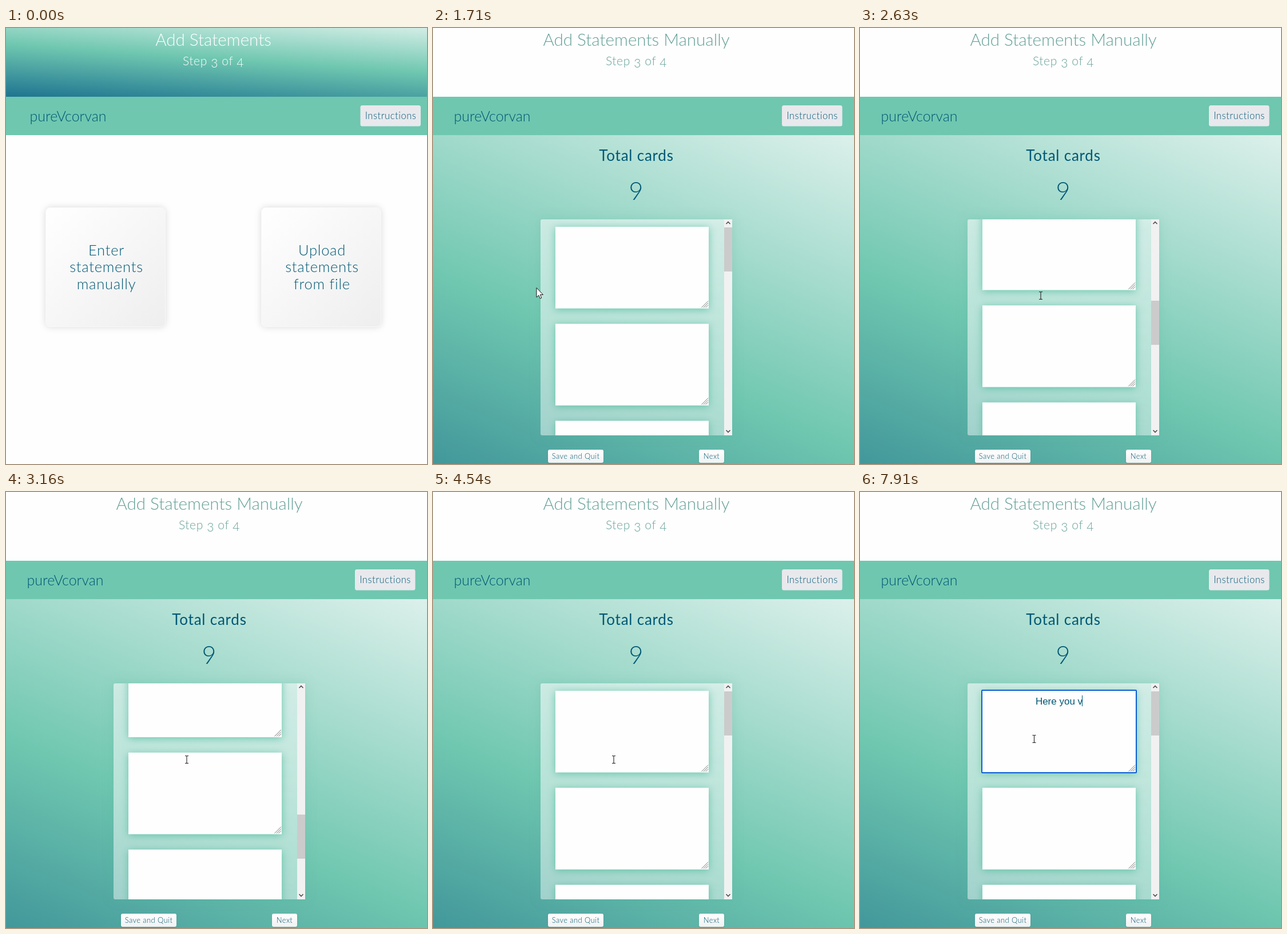
Animation of 736 by 761 pixels, one loop 8 s. Source, as an HTML page:

```html
<!DOCTYPE html>
<html lang="en">
<head>
<meta charset="utf-8">
<title>Add statements</title>
<style>
  html, body { margin: 0; width: 100%; height: 100%; overflow: hidden; background: #fefefe; }
  svg { display: block; width: 100vw; height: 100vh; }
  text { font-family: Lato, "Open Sans", sans-serif; font-weight: 300; fill: #005875; letter-spacing: .03em; }
  .title { font-size: 29.6px; letter-spacing: 0; }
  .step { font-size: 21px; }
  .brand { font-size: 25px; letter-spacing: 0; }
  .choice { font-size: 25.5px; }
  .small { font-size: 13px; }
  .mid { text-anchor: middle; }
  .typed { font: 17px "Liberation Sans", Arial, sans-serif; letter-spacing: 0; white-space: pre; }
  .tile { filter: drop-shadow(0 0 6px rgba(0, 0, 0, .14)); }
  .panel { filter: drop-shadow(0 0 9px rgba(80, 180, 155, .5)); }
  .field { fill: #fefefe; filter: drop-shadow(0 2px 7px rgba(75, 185, 155, .75)); }
  .button { filter: drop-shadow(0 1px 1px rgba(0, 0, 0, .12)); }
</style>
</head>
<body>
<svg viewBox="0 0 736 761" preserveAspectRatio="none">
  <defs>
    <linearGradient id="headerFill" gradientUnits="userSpaceOnUse" x1="0" y1="-50" x2="-11.5" y2="119.2">
      <stop offset="0" stop-color="#d2ede5"/>
      <stop offset=".46" stop-color="#6fc7b0"/>
      <stop offset="1" stop-color="#1f7490"/>
    </linearGradient>
    <linearGradient id="pageFill" gradientUnits="userSpaceOnUse" x1="0" y1="-122" x2="-315" y2="629">
      <stop offset="0" stop-color="#dcf0eb"/>
      <stop offset=".625" stop-color="#6fc7b0"/>
      <stop offset="1" stop-color="#42979a"/>
    </linearGradient>
    <linearGradient id="tileFill" x2="1" y2="1">
      <stop offset="0" stop-color="#fff"/>
      <stop offset="1" stop-color="#eee"/>
    </linearGradient>
    <linearGradient id="panelFill" x2="0" y2="1">
      <stop offset="0" stop-color="#fff" stop-opacity=".58"/>
      <stop offset="1" stop-color="#fff" stop-opacity=".46"/>
    </linearGradient>
    <linearGradient id="buttonFill" x2="0" y2="1">
      <stop offset="0" stop-color="#fff"/>
      <stop offset="1" stop-color="#f1f1f1"/>
    </linearGradient>
    <clipPath id="view"><rect x="188" y="334" width="321" height="377"/></clipPath>
  </defs>

  <g id="choosePage">
    <rect width="736" height="761" fill="#fefefe"/>
    <rect width="736" height="120" fill="url(#headerFill)"/>
  </g>

  <g id="entryPage">
    <rect width="736" height="761" fill="#fefefe"/>
    <rect y="187" width="736" height="574" fill="url(#pageFill)"/>
    <text class="mid" x="355.5" y="231.5" style="font-size: 26px; font-weight: 400">Total cards</text>
    <text class="mid" x="355.5" y="300" font-size="43">9</text>
    <rect class="panel" x="188" y="334" width="335" height="377" rx="3" fill="url(#panelFill)"/>
    <g clip-path="url(#view)"><g id="fields"></g></g>
    <rect x="509" y="334" width="14" height="377" fill="#f1f1f1"/>
    <rect id="thumb" x="509" width="14" height="77" fill="#cbcbcb"/>
    <path d="M512.5 342l3.5-3.5 3.5 3.5M512.5 702l3.5 3.5 3.5-3.5" fill="none" stroke="#505050" stroke-width="1.7"/>
    <g id="focus">
      <rect x="213" y="346" width="270" height="144" rx="1" fill="none" stroke="#0a5fd3" stroke-width="2"/>
      <text id="typed" class="typed mid" x="348" y="371"></text>
      <rect id="caret" y="355" width="1" height="19" fill="#005875"/>
    </g>
  </g>

  <circle id="clickSpot" r="10" fill="#c8d400" opacity=".65"/>
  <g id="cursor">
    <path id="arrow" d="M0 0V16.5L3.8 13 6.3 18.7 8.8 17.6 6.4 12H11.5Z" fill="#fff" stroke="#000" stroke-width=".9"/>
    <path id="hand" d="M-.7 11V1.3a1.5 1.5 0 0 1 3 0V6.6a1.4 1.4 0 0 1 2.7.4 1.3 1.3 0 0 1 2.5.5 1.2 1.2 0 0 1 2.1.7V13q0 3-1.8 4.6V19.5H1.6V17.6L-3.4 11.4a1.4 1.4 0 0 1 2.1-1.6z" fill="#fff" stroke="#111" stroke-width="1"/>
    <path id="beam" d="M-3-6.5h2q1 0 1 1 0-1 1-1h2M0-5.5v11M-3 6.5h2q1 0 1-1 0 1 1 1h2" fill="none" stroke="#222" stroke-width="1.1"/>
  </g>
</svg>
<script>
const LOOP = 8000, TICK = 65.9, FIRST_TICK = 452;
const PITCH = 169.3, FIELD_TOP = 347, FIELD_HEIGHT = 142.5, THUMB_TOP = 348, SCROLL_RATIO = 4.22;
const INK = '#005875';
const $ = id => document.getElementById(id);
const show = (id, on) => { $(id).style.display = on ? '' : 'none'; };
const add = (id, markup) => $(id).insertAdjacentHTML('beforeend', markup);

// Title, brand and button shared by both pages; digits hang below the baseline.
const heading = (title, color, center, brandX, buttonX) => `
  <text class="title mid" style="fill:${color}" x="${center}" y="31">${title}</text>
  <text class="step mid" style="fill:${color}" x="${center}" y="65">Step <tspan dy="4">3</tspan><tspan dy="-4"> of </tspan><tspan dy="3">4</tspan></text>
  <rect y="120" width="736" height="67" fill="#6fc7b0"/>
  <text class="brand" x="${brandX}" y="163">pureVcorvan</text>
  <rect x="${buttonX}" y="135" width="105.5" height="36.5" rx="3.5" fill="#e8e9ed"/>
  <text class="mid" font-size="16.6" x="${buttonX + 53}" y="159">Instructions</text>`;

const choice = (id, x, lines) => `
  <rect id="${id}" class="tile" x="${x + .5}" y="313.5" width="209" height="208" rx="8" fill="url(#tileFill)" stroke="#f8f8f8"/>
  <g id="${id}Label" fill="${INK}">${lines.map((line, i) =>
    `<text class="choice mid" style="fill:inherit" x="${x + 106.5}" y="${397 + i * 29.3}">${line}</text>`).join('')}</g>`;

const button = (x, width, label) => `
  <rect class="button" x="${x}" y="736" width="${width}" height="23" rx="3" fill="url(#buttonFill)"/>
  <text class="small mid" x="${x + width / 2}" y="752">${label}</text>`;

const field = i => {
  const y = FIELD_TOP + i * PITCH;
  const grip = [11.5, 8, 4.5].map(d => `M${481 - d} ${y + 141}l${d}-${d}`).join('');
  return `<rect class="field" x="214" y="${y}" width="268" height="${FIELD_HEIGHT}"/>
    <path d="${grip}" stroke="#777" stroke-width="1"/>`;
};

add('choosePage', heading('Add Statements', '#fff', 362.5, 41.5, 619.5)
  + choice('manual', 69, ['Enter', 'statements', 'manually'])
  + choice('upload', 446, ['Upload', 'statements', 'from file']));
add('entryPage', heading('Add Statements Manually', '#64a097', 355.5, 36.5, 610)
  + button(201, 97, 'Save and Quit') + button(465, 44, 'Next'));
add('fields', Array.from({ length: 9 }, (_, i) => field(i)).join(''));

// Keys hold a tick followed by one or more values.
const scrollKeys = [[26, 0], [28, 179], [30, 330], [35, 680], [37, 680], [41, 908], [44, 1110], [45, 1147],
  [55, 1147], [56, 1090], [58, 790], [60, 300], [61, 80], [62, 0]];
const cursorKeys = [[0, 499, 685], [6, 156, 451], [17, 156, 451], [25, 316, 467], [67, 316, 467], [71, 304.5, 431]];
const typing = [[86, 'H'], [88, 'He'], [90, 'Her'], [92, 'Here'], [95, 'Here '], [104, 'Here y'],
  [105, 'Here yo'], [106, 'Here you'], [108, 'Here you '], [112, 'Here you v']];

const linear = u => u;
const smooth = u => u * u * (3 - 2 * u);

function sample(keys, tick, ease) {
  const next = keys.findIndex(key => key[0] > tick);
  if (next === 0) return keys[0].slice(1);
  if (next < 0) return keys[keys.length - 1].slice(1);
  const a = keys[next - 1], b = keys[next];
  const u = ease((tick - a[0]) / (b[0] - a[0]));
  return a.slice(1).map((v, i) => v + (b[i + 1] - v) * u);
}

function drawEntry(tick) {
  const [scroll] = sample(scrollKeys, tick, linear);
  $('fields').setAttribute('transform', `translate(0 ${-Math.round(scroll)})`);
  $('thumb').setAttribute('y', Math.round(THUMB_TOP + scroll / SCROLL_RATIO));

  show('focus', tick >= 72);
  if (tick < 72) return;
  const typed = $('typed');
  typed.textContent = typing.reduce((text, [at, value]) => tick >= at ? value : text, '');
  const half = typed.textContent ? typed.getComputedTextLength() / 2 : 0;
  $('caret').setAttribute('x', Math.max(348, Math.floor(347.6 + half)));
  show('caret', !(tick >= 79 && tick < 86) && tick !== 103);
}

function drawCursor(tick, entry) {
  const [x, y] = sample(cursorKeys, tick, smooth);
  const hover = !entry && tick >= 0 && x < 278 && y < 522;
  const beam = entry && x >= 214;
  show('cursor', tick >= 0);
  show('hand', hover);
  show('beam', beam);
  show('arrow', !hover && !beam);
  $('cursor').setAttribute('transform', `translate(${x} ${y})`);
  $('clickSpot').setAttribute('transform', `translate(${x} ${y})`);
  show('clickSpot', tick === 10 || tick === 72 || tick === 73);

  $('manual').setAttribute('fill', hover ? INK : 'url(#tileFill)');
  $('manual').setAttribute('stroke', hover ? INK : '#f8f8f8');
  $('manualLabel').setAttribute('fill', hover ? '#fff' : INK);
}

function draw(ms) {
  const tick = Math.floor((ms - FIRST_TICK) / TICK);
  const entry = tick >= 11;
  show('choosePage', !entry);
  show('entryPage', entry);
  if (entry) drawEntry(tick);
  drawCursor(tick, entry);
}

const start = performance.now();
function loop() {
  draw((performance.now() - start) % LOOP);
  requestAnimationFrame(loop);
}
loop();
</script>
</body>
</html>
```
